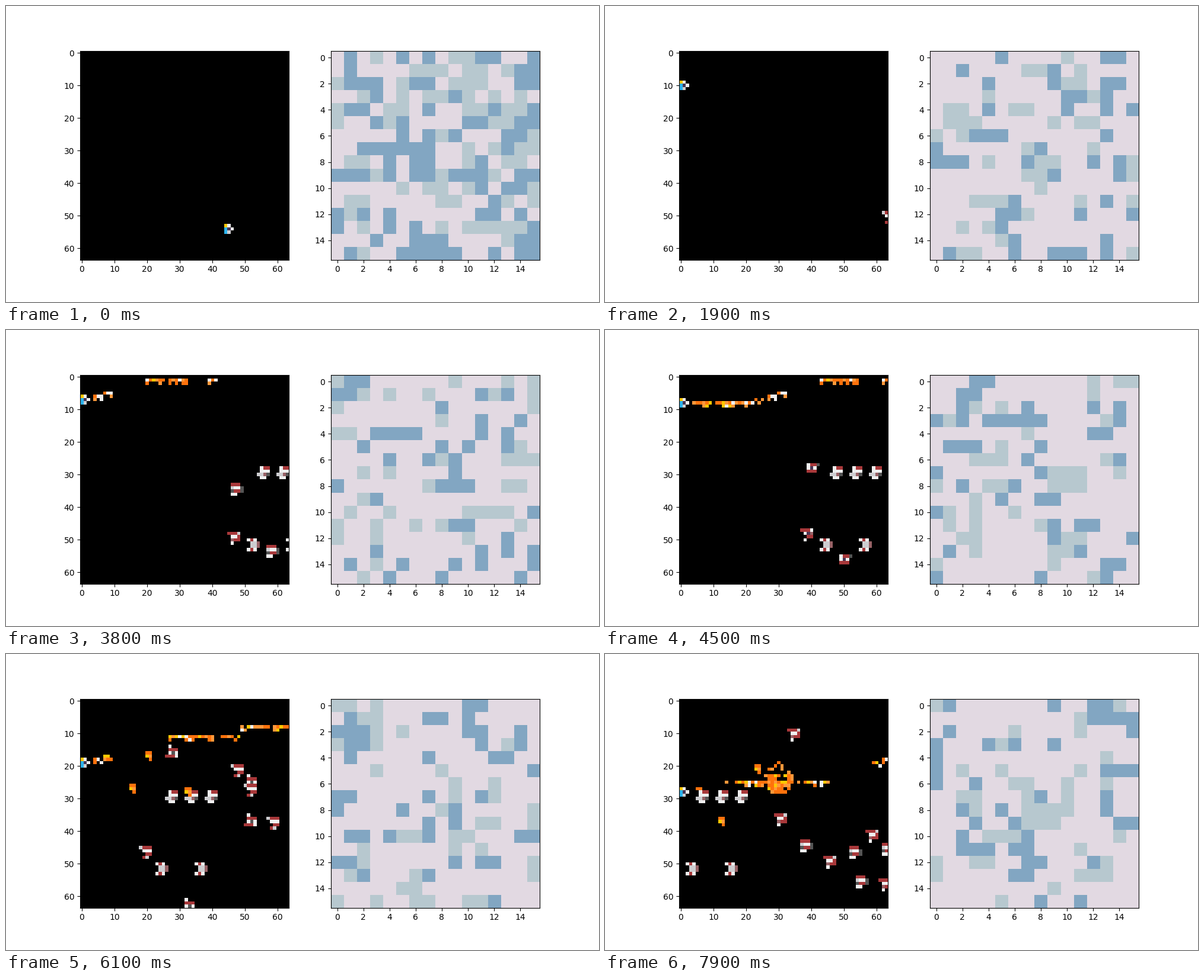
Write a matplotlib script that moves like this. It is 1000 px wide and 500 px high and loops after 8000 ms.

```python
import numpy as np
import matplotlib.pyplot as plt
from matplotlib.animation import FuncAnimation

FRAMES, STEP = 80, 100
SIZE, CELLS = 64, 16
FOE_SPEED, SHOT_SPEED, BOLT_SPEED = 1.2, 3.2, 2

INK = {
    "R": (168, 56, 58), "W": (240, 240, 240), "L": (205, 205, 208),
    "D": (84, 84, 84), "P": (72, 54, 84), "M": (152, 98, 102),
    "O": (255, 114, 12), "o": (255, 152, 58), "Y": (255, 200, 0),
    "B": (44, 180, 238), "C": (190, 216, 228),
}
FIELD = np.array([(226, 217, 226), (183, 200, 207), (130, 166, 194)], np.uint8)

# Sprites, rows separated by slashes
SHIP, FLASH = "YW./BPW/BL.", ".../CC./CC."
ROUND = [".WRR/.WWW/LLMD/.WW."]
WINGED = ["WRW./.LLM/.LLM/WRW."]
DRIFT = ["RRRW/.WPM/..RR/.W..", "LRRR/.WWW/..RR/.RL.",
         "RRR./LWWD/DRRD/WW..", "WRRD/WPW./RRR.",
         ".W../.RRR/.WDW/RRRW", "RRRL/.WWR/.MRR/.W.."]
BOLT = "OO/Yo/.O"

# Entry time, height and heading in degrees of each foe
FOES = [(*foe, DRIFT) for foe in [
    (16.6, 50.7, -44), (22.2, 50, -6), (31.8, 49.6, 19), (44.7, 28.2, -25),
    (45.4, 34.9, -40), (49.6, 27.4, -6), (49.7, 35, 0), (55, 33.8, 18),
    (61, 55.3, -20), (65.7, 55.6, -41), (72.8, 42.5, -20), (70.7, 53.1, 5),
    (76.5, 54.8, 5), (77.3, 44, 0)]]
FOES += [(29.7 + 5 * i, 28, 0, ROUND) for i in range(3)]
FOES += [(27.2 + 10 * i, 50, 0, WINGED) for i in range(2)]

DEATHS = {0: 62, 3: 71, 5: 75}                             # foe: time
BOLTS = [(47, 1), (56, 0), (60, 15), (69, 18), (69, 4)]    # time, foe
FIRING = [(26, 27), (29, 33), (36, 54), (59, 62), (66, 69), (71, 76), (78, 80)]


def cell(v):
    return int(np.floor(v + .5))


def put(img, x, y, key):
    if 0 <= x < SIZE and 0 <= y < SIZE:
        img[y, x] = INK[key]


def stamp(img, art, x, y):
    for j, line in enumerate(art.split("/")):
        for i, key in enumerate(line):
            if key != ".":
                put(img, cell(x) + i, cell(y) + j, key)


def ship_pos(t):
    x = np.interp(t, [0, 19], [44, 0])
    y = np.interp(t, [0, 23, 33, 36, 39, 46, 47, 54, 66, 75, 79],
                  [53, 0, 0, 4, 7, 7, 10, 10, 24, 24, 27])
    return x, y


def foe_pos(k, t):
    enter, y, angle, _ = FOES[k]
    way = FOE_SPEED * (t - enter)
    a = np.radians(angle)
    return SIZE - way * np.cos(a), y + way * np.sin(a)


def draw_foe(img, k, t):
    poses = FOES[k][3]
    if FOES[k][0] <= t < DEATHS.get(k, FRAMES):
        stamp(img, poses[(t // 15 + 3 * k) % len(poses)], *foe_pos(k, t))


def draw_shot(img, born, t):
    """A short pulse of fire, ragged in a way fixed by its birth."""
    rng = np.random.default_rng(born)
    x = cell(1 + SHOT_SPEED * (t - born))
    y = cell(ship_pos(born)[1]) + 1
    for i in range(3):
        keys = rng.choice(list("OOOooYW"), 2)
        upper, lower = rng.random(2)
        if upper < .88:
            put(img, x + i, y, keys[0])
        if lower < .4:
            put(img, x + i, y + 1, keys[1])


def draw_bolt(img, born, k, t):
    start = np.array(foe_pos(k, born))
    aim = np.array(ship_pos(born)) - start
    x, y = start + aim / np.hypot(*aim) * BOLT_SPEED * (t - born)
    if x > 0:
        stamp(img, BOLT, x, y)


def draw_blast(img, k, t):
    age = t - DEATHS[k]
    if not 0 <= age < 6:
        return
    rng = np.random.default_rng(k)
    x, y = foe_pos(k, t)
    for dy in range(-5, 5):
        for dx in range(-5, 6):
            key = rng.choice(list("OOOooY"))
            fill = .9 if dy > -2 else .4
            if rng.random() < fill and np.hypot(dx * 1.2, dy) <= age + 1:
                put(img, cell(x) + 1 + dx, cell(y) + dy, key)


def game(t):
    img = np.zeros((SIZE, SIZE, 3), np.uint8)
    for k in range(len(FOES)):
        draw_foe(img, k, t)
    for start, end in FIRING:
        for born in range(start, min(end, t)):
            draw_shot(img, born, t)
    for born, k in BOLTS:
        if born <= t:
            draw_bolt(img, born, k, t)
    for k in DEATHS:
        draw_blast(img, k, t)
    art = FLASH if 68 <= t < 71 else SHIP
    if 21 <= t < 32:
        art = "/".join(reversed(art.split("/")))
    stamp(img, art, *ship_pos(t))
    return img


def clumps(rng):
    n = rng.random((CELLS, CELLS))
    return n + .25 * np.roll(n, 1, 1) + .15 * np.roll(n, 1, 0)


def cells(t):
    """Loose patches of two colours; the middle one surges once."""
    rng = np.random.default_rng(500 + t)
    fade, surge = np.exp(-t / 5), np.exp(-((t - 27) / 2) ** 2)
    top = .17 + .16 * fade - .05 * surge
    mid = .16 + .1 * fade + .42 * surge
    high, low = clumps(rng), clumps(rng)
    level = np.zeros((CELLS, CELLS), int)
    level[high >= np.quantile(high, 1 - top)] = 2
    low[level == 2] = -1
    level[low >= np.quantile(low, 1 - mid)] = 1
    return FIELD[level]


fig, (left, right) = plt.subplots(1, 2, figsize=(10, 5), dpi=100)
screen = left.imshow(game(0), interpolation="nearest")
board = right.imshow(cells(0), interpolation="nearest")


def update(t):
    screen.set_data(game(t))
    board.set_data(cells(t))
    return screen, board


anim = FuncAnimation(fig, update, frames=FRAMES, interval=STEP,
                     init_func=lambda: update(0), repeat=True, repeat_delay=0)
plt.show()
```
